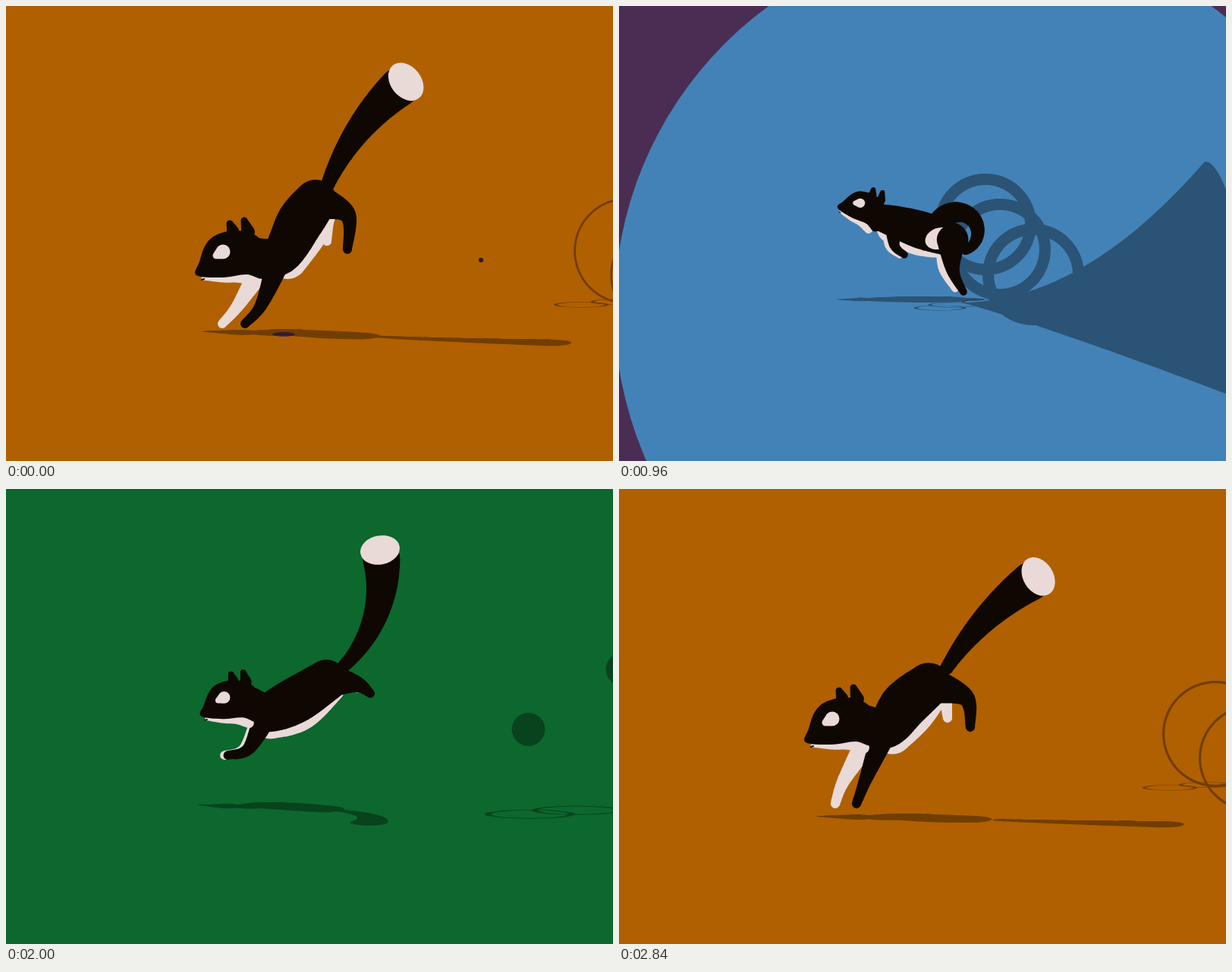
An HTML page with a canvas for the animation above (2.88 s loop, 800 by 600 pixels).

```html
<!DOCTYPE html>
<html lang="en">
<head>
<meta charset="utf-8">
<title>Running squirrel</title>
<style>
html, body { margin: 0; width: 100%; height: 100%; overflow: hidden; }
canvas { display: block; width: 100%; height: 100%; }
</style>
</head>
<body>
<canvas id="stage" width="800" height="600"></canvas>
<script>
const ctx = document.getElementById('stage').getContext('2d');
const STRIDE = 720, STEP = 40, TAU = 2 * Math.PI, DEG = Math.PI / 180;
const DARK = '#0f0802', LIGHT = '#e9dad7';
const SCENES = [[75, 45, 84], [67, 130, 183], [12, 104, 45], [176, 96, 0]];

// Key poses of one stride.
// head: nose x, y, scale, pitch; spine: chest, middle, hip;
// tail: base x, y, heading, turn, length; legs: joint, paw, shift of the far leg;
// shadow: ground, lean, depth.
const POSES = [
  { at: 0, size: [1], head: [251, 355, 1, 0], spine: [362, 328, 388, 284, 408, 257],
    tail: [423, 238, -68, 30, 175], fore: [337, 393, 315, 419, -30],
    hind: [450, 275, 450, 321, -27], shadow: [425, .002, .06] },
  { at: 120, size: [.78], head: [288, 319, .67, 10], spine: [355, 310, 378, 311, 406, 321],
    tail: [430, 336, -33, -140, 139], fore: [361, 345, 361, 369, 6],
    hind: [402, 370, 376, 383, 20], shadow: [383, -.002, .1] },
  { at: 240, size: [.8], head: [288, 266, .655, 30], spine: [363, 284, 400, 296, 438, 308],
    tail: [457, 322, -23, -266, 121], fore: [363, 315, 376, 328, -6],
    hind: [440, 348, 454, 377, -11], shadow: [387, 0, 0] },
  { at: 280, size: [1.08], head: [240, 249, .9, 25], spine: [334, 270, 395, 288, 460, 300],
    tail: [485, 309, -14, -276, 178], fore: [320, 312, 334, 354, 0],
    hind: [478, 336, 521, 363, -16], shadow: [426, -.0006, .02] },
  { at: 440, size: [.95], head: [264, 270, .72, 8], spine: [338, 278, 386, 277, 438, 254],
    tail: [460, 240, -33, -145, 163], fore: [318, 309, 282, 303, 14],
    hind: [466, 253, 496, 248, -7], shadow: [390, -.0018, .15] },
  { at: 680, size: [1.03], head: [246, 334, 1, 0], spine: [352, 315, 377, 284, 408, 258],
    tail: [432, 236, -58, 26, 172], fore: [325, 383, 313, 415, -28],
    hind: [457, 275, 463, 314, -30], shadow: [427, .0019, .05] }
];

// Head parts around the nose; bands are x, y, half width.
const HEAD = [[0, 0], [4, -18], [12, -40], [26, -53], [52, -59], [79, -52], [102, -22], [89, 4], [66, -1], [34, 3]];
const MUZZLE = [[9, 4, 2.5], [34, 4, 5.5], [56, 3, 7], [76, 7, 8]];
const EARS = [[[48, -58, 8], [44, -68, 4.5]], [[68, -57, 9], [63, -72, 4.5]]];
const EYE = [[26, -26, 4.5], [35, -31, 9.5]];
const MOUTH = [[7, 6, 1], [10, 5, 1]];

// Rings and dots, placed relative to the drifting ground.
const leap = {
  ground: 428, spread: .85, fade: 50,
  rings: [[399, 332], [461, 375], [615, 371]],
  dots: [[337, 317, 22, 40], [461, 238, 22, 40], [504, 317, 6.5, 40], [716, 335, 17, -20]]
};
const chain = rings => ({ ground: 392, spread: .52, fade: 280, rings, dots: [] });
const SCENERY = [leap, chain([[409, 288], [428, 321], [472, 354]]),
  leap, chain([[349, 323], [397, 355]])];
const drift = [[0, -90], [120, 0], [240, 74], [280, 102], [440, 266], [680, 437], [1440, 1050]];
const burst = [[0, 366, 433], [120, 409.5, 391], [240, 489, 400], [280, 496, 404], [720, 800, 420]];
const plume = [ // time, x, y, length, rise, drop
  [140, 430, 392, 0, 0, 0], [240, 450, 391, 328, 193, 112],
  [280, 440, 418, 430, 98, 88], [420, 850, 418, 430, 60, 60]];

const tint = (rgb, k = 1) => `rgb(${rgb.map(v => Math.round(v * k))})`;
const clamp = (v, low, high) => Math.max(low, Math.min(high, v));

function linear(track, p) {
  let i = 0;
  while (i < track.length - 2 && track[i + 1][0] <= p) i++;
  const [a, b] = [track[i], track[i + 1]], s = (p - a[0]) / (b[0] - a[0]);
  return a.slice(1).map((v, k) => v + (b[k + 1] - v) * s);
}

// Cyclic Hermite interpolation between the key poses.
function poseAt(p) {
  const n = POSES.length, key = j => POSES[(j + n) % n];
  const time = j => key(j).at + STRIDE * Math.floor(j / n);
  let i = n - 1;
  while (POSES[i].at > p) i--;
  const h = time(i + 1) - time(i), s = (p - time(i)) / h, s2 = s * s, s3 = s2 * s;
  const blend = (part, k) => {
    const v = j => key(j)[part][k];
    const slope = j => (v(j + 1) - v(j - 1)) / (time(j + 1) - time(j - 1));
    return v(i) * (2 * s3 - 3 * s2 + 1) + v(i + 1) * (3 * s2 - 2 * s3)
      + h * (slope(i) * (s3 - 2 * s2 + s) + slope(i + 1) * (s3 - s2));
  };
  const pose = {};
  for (const part in key(i))
    if (part !== 'at') pose[part] = key(i)[part].map((_, k) => blend(part, k));
  return pose;
}

// A tapered band: circles laid closely along a Catmull-Rom curve.
function band(points) {
  const circles = [], at = i => points[clamp(i, 0, points.length - 1)];
  for (let i = 0; i < points.length - 1; i++) {
    const [a, b, c, d] = [at(i - 1), at(i), at(i + 1), at(i + 2)];
    const steps = Math.ceil(Math.hypot(c[0] - b[0], c[1] - b[1]) / 1.5) + 1;
    for (let q = 0; q <= steps; q++) {
      const s = q / steps;
      circles.push(b.map((v, k) => v + s * (c[k] - a[k]
        + s * (2 * a[k] - 5 * v + 4 * c[k] - d[k] + s * (3 * v - a[k] - 3 * c[k] + d[k]))) / 2));
    }
  }
  return circles;
}

function fillCircles(circles, color, flatten = 1) {
  ctx.beginPath();
  for (const [x, y, w] of circles) {
    const r = Math.max(.4, w);
    ctx.moveTo(x + r, y);
    ctx.ellipse(x, y, r, r * flatten, 0, 0, TAU);
  }
  ctx.fillStyle = color;
  ctx.fill();
}

function fillOutline(points, color) {
  const n = points.length, at = i => points[(i + n) % n];
  ctx.beginPath();
  ctx.moveTo(...at(0));
  for (let i = 0; i < n; i++) {
    const [a, b, c, d] = [at(i - 1), at(i), at(i + 1), at(i + 2)];
    ctx.bezierCurveTo(b[0] + (c[0] - a[0]) / 6, b[1] + (c[1] - a[1]) / 6,
      c[0] - (d[0] - b[0]) / 6, c[1] - (d[1] - b[1]) / 6, ...c);
  }
  ctx.fillStyle = color;
  ctx.fill();
}

function fillEllipse(x, y, rx, ry, turn, color, hole = 0) {
  ctx.beginPath();
  ctx.ellipse(x, y, rx, ry, turn, 0, TAU);
  if (hole > 0) {
    ctx.moveTo(x + rx * hole, y);
    ctx.ellipse(x, y, rx * hole, ry * hole, turn, 0, TAU);
  }
  ctx.fillStyle = color;
  ctx.fill('evenodd');
}

function drawPlume(p, color) {
  const [x, y, length, rise, drop] = linear(plume, p);
  ctx.beginPath();
  ctx.moveTo(x, y);
  for (let s = 0; s <= 1; s += .02) ctx.lineTo(x + length * s, y - rise * s ** 2);
  ctx.quadraticCurveTo(x + length * 1.06, y - rise, x + length * 1.2, y);
  for (let s = 1.2; s > 0; s -= .02) ctx.lineTo(x + length * s, y + drop * s ** 1.1);
  ctx.fillStyle = color;
  ctx.fill();
}

function drawScenery(index, p) {
  const { ground, spread, fade, rings, dots } = SCENERY[index];
  const color = tint(SCENES[index], .64), [dx] = linear(drift, p);
  for (const [x, y] of rings) {
    const r = 70 * (1 - Math.exp((20 - p) / 70));
    if (r <= 0) continue;
    const w = Math.min(r, 13 * Math.exp((280 - p) / fade));
    if (w > .5) fillEllipse(x + dx, y, r, r, 0, color, 1 - w / r);
    fillEllipse(x + dx - 60, ground - (y - 339) * .12, r * spread, r * spread * .1, 0, color, .86);
  }
  for (const [x, y, size, birth] of dots) {
    const r = size * (1 - Math.exp((birth - p) / 100));
    if (r > 0) fillEllipse(x + dx, y, r, r, 0, color);
  }
  if (p > 140 && p < 420) drawPlume(p, color);
}

function drawSquirrel(p) {
  const pose = poseAt(p), [size] = pose.size;
  const [noseX, noseY, headSize, pitch] = pose.head;
  const cos = Math.cos(pitch * DEG) * headSize, sin = Math.sin(pitch * DEG) * headSize;
  const onHead = ([x, y, w = 0]) =>
    [noseX + x * cos - y * sin, noseY + x * sin + y * cos, w * headSize];
  const headBand = (points, color) => fillCircles(band(points.map(onHead)), color);

  const joint = (x, y, w) => [x, y, w * size];
  const [cx, cy, mx, my, hx, hy] = pose.spine;
  const chest = joint(cx, cy, 26), middle = joint(mx, my, 31), hip = joint(hx, hy, 28);
  const trunk = band([onHead([78, -24, 25]), chest, middle, hip]);
  const bodyLength = Math.hypot(hx - cx, hy - cy), sag = 11 * size / bodyLength;
  const belly = band([chest, middle, joint(hx, hy, 20)])
    .map(([x, y, w]) => [x + (cy - hy) * sag, y + (hx - cx) * sag, w]);

  // The tail is an arc that thickens toward its pale end.
  const [tx, ty, heading, turn, length] = pose.tail;
  const onTail = s => {
    const half = turn * s / 2 * DEG, angle = heading * DEG + half;
    const chord = length * s * (half ? Math.sin(half) / half : 1);
    return [tx + chord * Math.cos(angle), ty + chord * Math.sin(angle),
      length * (.052 + .105 * s ** 1.15)];
  };
  const tail = Array.from({ length: 121 }, (_, i) => onTail(i / 120 * .93));

  const leg = ([jx, jy, px, py], [rx, ry], widths, dx = 0, dy = 0) => fillCircles(band([
    joint(rx + dx / 2, ry, widths[0]), joint(jx + dx, jy + dy, widths[1]),
    joint(px + dx, py + dy, widths[2])]), dx || dy ? LIGHT : DARK);
  const foreWidths = [17, 8.5, 6], hindWidths = [24, 11, 6];
  const foreShift = pose.fore[4], hindShift = pose.hind[4];

  const [ground, lean, depth] = pose.shadow;
  const profile = [...band([onHead([0, 0, 3]), onHead([45, -20, 22])]), ...trunk, ...tail];
  fillCircles(profile.map(([x, y, w]) => {
    const height = ground - y;
    return [x + lean * height * height, ground + depth * height, w];
  }), 'rgba(0,0,0,.36)', .16);

  fillCircles(tail, DARK);
  leg(pose.fore, chest, foreWidths, foreShift);
  leg(pose.hind, [hx - hindShift / 2, hy], hindWidths, hindShift, -.4 * Math.abs(hindShift));
  fillCircles(belly, LIGHT);
  fillCircles(trunk, DARK);
  const [endX, endY] = onTail(1);
  fillEllipse(endX, endY, length * .115, length * .158, (heading + turn) * DEG, LIGHT);
  leg(pose.hind, hip, hindWidths);
  leg(pose.fore, chest, foreWidths);
  headBand(MUZZLE, LIGHT);
  fillOutline(HEAD.map(point => onHead(point).slice(0, 2)), DARK);
  for (const ear of EARS) headBand(ear, DARK);
  headBand(EYE, LIGHT);
  headBand(MOUTH, DARK);
}

function draw(ms) {
  const t = Math.floor(ms / STEP) * STEP % (STRIDE * SCENES.length);
  const index = Math.floor(t / STRIDE), p = t % STRIDE;
  const previous = (index + SCENES.length - 1) % SCENES.length;
  ctx.fillStyle = tint(SCENES[previous]);
  ctx.fillRect(0, 0, 800, 600);
  drawScenery(previous, p + STRIDE);
  const r = 15 + 2 * p;
  fillEllipse(...linear(burst, p), r, r * Math.min(1, .2 + p / 100), 0, tint(SCENES[index]));
  drawScenery(index, p);
  drawSquirrel(p);
}

const start = performance.now();
function tick() {
  draw(performance.now() - start);
  requestAnimationFrame(tick);
}
tick();
</script>
</body>
</html>
```
